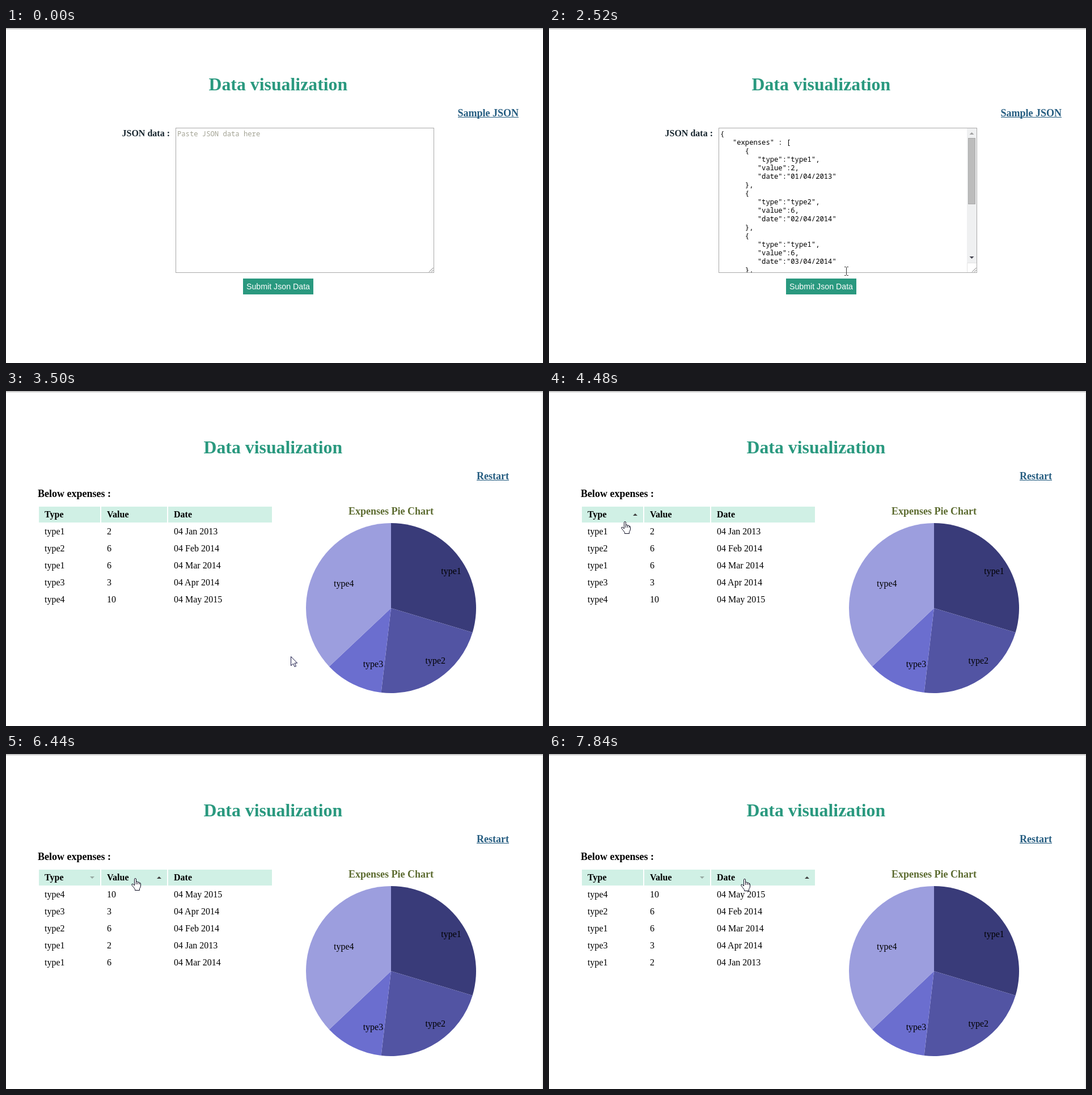
An HTML page for the animation above (8000 ms loop, 947 by 591 pixels).

```html
<!DOCTYPE html>
<html lang="en">
<head>
<meta charset="utf-8">
<title>Data visualization</title>
<style>
html, body { margin: 0; width: 100%; height: 100%; overflow: hidden; background: #fff; }
svg { display: block; }
text { font: 16px "Liberation Serif", "Times New Roman", serif; white-space: pre; }
.b { font-weight: bold; }
.mid { font-size: 18px; }
.title { font-size: 31.8px; fill: #2a997f; }
.link { fill: #245c80; }
.mono { font: 12.2px "Noto Sans Mono", "DejaVu Sans Mono", monospace; }
.btn { font: 14.2px "Liberation Sans", Arial, sans-serif; fill: #fff; }
</style>
</head>
<body>
<svg width="947" height="591" viewBox="0 0 947 591">
  <defs><clipPath id="area"><rect x="300" y="177" width="437" height="254"/></clipPath></defs>
  <rect width="947" height="591" fill="#fff"/>
  <rect width="947" height="1" fill="#e2e2e2"/>
  <rect y="1" width="947" height="1" fill="#a3a3a3"/>
  <text id="title" class="b title" y="110">Data visualization</text>

  <g id="form">
    <text class="b mid link" x="796.5" y="156">Sample JSON</text>
    <rect class="link" x="797" y="157" width="107" height="1"/>
    <text class="b" x="204.5" y="191" fill="#17252e">JSON data :</text>
    <rect x="299.5" y="176.5" width="455" height="255" fill="#fff" stroke="#a9a9a9"/>
    <text id="hint" class="mono" x="302" y="191" fill="#a3a394">Paste JSON data here</text>
    <g id="filled">
      <g id="json" clip-path="url(#area)"></g>
      <rect x="737" y="177" width="17" height="237" fill="#eff0f1"/>
      <rect x="739.5" y="194.5" width="12" height="116" fill="#bcbcbc" stroke="#a8a8a8"/>
      <path d="M741.5 188h8l-4-4z" fill="#a0a0a0"/>
      <path d="M741.5 403h8l-4 4z" fill="#454550"/>
      <path d="M754 414.5H737.5V431" fill="none" stroke="#e2e2e2"/>
    </g>
    <path d="M746 430.5l7.5-7.5M750 430.5l3.5-3.5" stroke="#777" fill="none"/>
    <rect x="418" y="442" width="124" height="28" fill="#2a997f"/>
    <rect id="focus" x="417.5" y="441.5" width="125" height="29" fill="none" stroke="#7fb2d8"/>
    <text class="btn" x="424" y="461">Submit Json Data</text>
  </g>

  <g id="result">
    <rect x="945" y="2" width="2" height="589" fill="#ededed"/>
    <text class="b mid link" x="830" y="156">Restart</text>
    <rect class="link" x="830" y="157" width="57" height="1"/>
    <text class="b mid" x="56" y="187">Below expenses :</text>
    <g id="heads"></g>
    <g id="rows"></g>
    <text class="b mid" x="604" y="218" fill="#5c6b30">Expenses Pie Chart</text>
    <g id="pie"></g>
  </g>

  <g id="cursor" stroke="#0c0c20" stroke-linejoin="round">
    <path id="arrow" fill="#fff" stroke="#141445" d="M.5 .5V16.5L4.5 13L7 18.5L9.5 17.5L7 12H11.7Z"/>
    <path id="beam" fill="none" stroke="#333" d="M-3 -7.5H-.5L.5 -6.5L1.5 -7.5H4M.5 -6.5V6.5M-3 7.5H-.5L.5 6.5L1.5 7.5H4"/>
    <g id="hand" transform="translate(-6 0)">
      <path fill="#fff" d="M5.5 13V1.7Q5.5 .5 7 .5T8.5 1.9V6.3Q11.5 5.3 11.5 7.3Q14.5 6.3 14.5 8.4Q16.5 8 16.5 10V14Q16.5 16 14.5 18.5V21.5H6.5V19.5L3.5 15.5L.9 12.2Q.3 9.5 3 10.3Z"/>
      <path fill="none" d="M8.5 6.3V11M11.5 7.3V11M14.5 8.4V11"/>
    </g>
  </g>
</svg>
<script>
const LOOP = 8000, STEP = 70;
const ENTER = 490, FILL = 2030, FOCUS = 3010, RESULT = 3500;
const $ = id => document.getElementById(id);
const show = (id, on) => $(id).style.display = on ? '' : 'none';
const label = (x, y, s, cls = '') => `<text class="${cls}" x="${x}" y="${y}">${s}</text>`;

const data = [
  ['type1', 2, '04 Jan 2013'],
  ['type2', 6, '04 Feb 2014'],
  ['type1', 6, '04 Mar 2014'],
  ['type3', 3, '04 Apr 2014'],
  ['type4', 10, '04 May 2015']
];

let edge = 58;
const cols = [['Type', 108], ['Value', 116], ['Date', 183]].map(([name, w]) => {
  const x = edge;
  edge += w + 2;
  return { name, x, w };
});

const sorts = [
  { at: 5250, key: 0, dir: 1 }, { at: 5880, key: 0, dir: -1 },
  { at: 6790, key: 1, dir: 1 }, { at: 7280, key: 1, dir: -1 }
];

// Each move eases along a curve from where the last one ended.
const START = [850, 503];
const moves = [
  { at: ENTER, end: 1050, bend: [770, 290], to: [836, 146] },
  { at: 2100, end: 2800, bend: [552, 355], to: [502, 468] },
  { at: RESULT, end: 4270, bend: [340, 320], to: [222, 229] },
  { at: 4270, end: 4760, bend: [153, 239], to: [92, 222] },
  { at: 6090, end: 6440, bend: [150, 222], to: [227, 219] },
  { at: 7350, end: 7840, bend: [285, 224], to: [344, 220] }
];
const easeOut = k => 1 - (1 - k) ** 2;

function pointer(t) {
  const i = moves.filter(m => m.at <= t).length - 1;
  if (i < 0) return null;
  const { at, end, bend, to } = moves[i];
  const from = i ? moves[i - 1].to : START;
  const u = easeOut(Math.min(1, (t - at) / (end - at))), v = 1 - u;
  return from.map((a, n) => Math.round(v * v * a + 2 * u * v * bend[n] + u * u * to[n]));
}

const inside = ([x, y], l, t, r, b) => x >= l && x < r && y >= t && y < b;

function pointerKind(p, onForm, hovered) {
  if (!onForm) return hovered >= 0 ? 'hand' : 'arrow';
  if (inside(p, 797, 140, 905, 161)) return 'hand';
  return inside(p, 299, 176, 737, 432) ? 'beam' : 'arrow';
}

function buildJson() {
  const lines = ['{', '   "expenses" : ['];
  data.slice(0, 3).forEach(([type, value, date], i) => lines.push(
    '      {', `         "type":"${type}",`, `         "value":${value},`,
    `         "date":"0${i + 1}/04/${date.slice(-4)}"`, '      },'));
  $('json').innerHTML = lines.map((s, i) => label(302, 191 + i * 15, s, 'mono')).join('');
}

function buildPie() {
  const cx = 679, cy = 383, r = 150;
  const colors = ['#393b79', '#5254a3', '#6b6ecf', '#9c9ede'];
  const sums = {};
  data.forEach(([type, value]) => sums[type] = (sums[type] || 0) + value);
  const total = Object.values(sums).reduce((a, b) => a + b);
  const at = (v, d) => {
    const a = v / total * 2 * Math.PI;
    return [cx + d * Math.sin(a), cy - d * Math.cos(a)];
  };
  let sum = 0, wedges = '', names = '';
  Object.keys(sums).sort().forEach((type, i) => {
    const next = sum + sums[type];
    const [x, y] = at((sum + next) / 2, 110);
    wedges += `<path fill="${colors[i]}" d="M${cx} ${cy}L${at(sum, r)}A${r} ${r} 0 0 1 ${at(next, r)}Z"/>`;
    names += label(x, y + 5.6, type);
    sum = next;
  });
  $('pie').innerHTML = wedges + names;
}

function drawTable({ key, dir }, hovered) {
  $('heads').innerHTML = cols.map(({ name, x, w }, i) => {
    const left = x + w - 18, active = i === key;
    const tri = active && dir < 0 ? `M${left} 216h8l-4 4z` : `M${left} 220h8l-4 -4z`;
    const icon = active || i === hovered
      ? `<path d="${tri}" fill="#404040" opacity="${active ? 0.4 : 1}"/>` : '';
    return `<rect x="${x}" y="204" width="${w}" height="28" fill="#d0f0e5"/>`
      + label(x + 10, 223, name, 'b') + icon;
  }).join('');

  const rows = data.slice();
  if (dir) rows.sort((a, b) => dir * (a[key] < b[key] ? -1 : a[key] > b[key] ? 1 : 0));
  $('rows').innerHTML = rows.map((row, i) =>
    row.map((s, c) => label(cols[c].x + 10, 253 + i * 30, s)).join('')).join('');
}

let last = -1;
function draw(now) {
  requestAnimationFrame(draw);
  const t = Math.floor((now % LOOP) / STEP) * STEP;
  if (t === last) return;
  last = t;

  const onForm = t < RESULT;
  show('form', onForm);
  show('result', !onForm);
  show('hint', t < FILL);
  show('filled', t >= FILL);
  show('focus', t >= FOCUS);
  $('title').setAttribute('x', onForm ? 357.5 : 348.5);

  const p = pointer(t);
  show('cursor', p);
  const hovered = p && !onForm
    ? cols.findIndex(c => inside(p, c.x, 204, c.x + c.w + 2, 233)) : -1;
  if (p) {
    const kind = pointerKind(p, onForm, hovered);
    ['arrow', 'beam', 'hand'].forEach(k => show(k, k === kind));
    $('cursor').setAttribute('transform', `translate(${p})`);
  }
  if (!onForm) drawTable(sorts.filter(s => s.at <= t).pop() || {}, hovered);
}

buildJson();
buildPie();
draw(performance.now());
</script>
</body>
</html>
```
